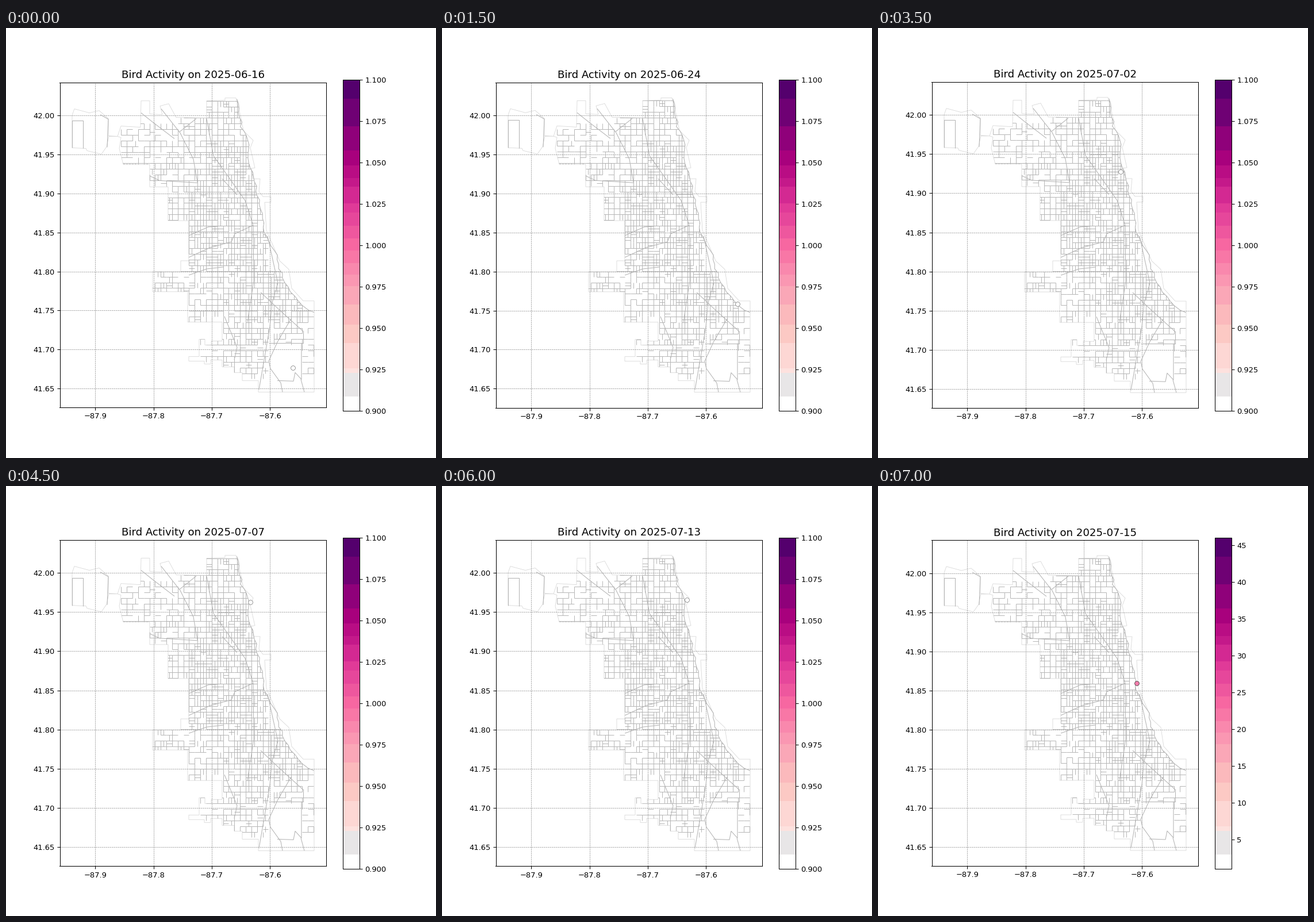
These frames come from a looping animation (748 by 748 pixels, 7.5 s). A matplotlib script:

```python
import numpy as np
import matplotlib.pyplot as plt
from matplotlib.animation import FuncAnimation
from matplotlib.cm import ScalarMappable
from matplotlib.collections import LineCollection
from matplotlib.colors import ListedColormap, Normalize
from matplotlib.patches import Polygon

BLOCK_W, BLOCK_H = 9.85, 9.9  # half a mile on the stage, in pixels
XLIM = (-87.9609, -87.5033)
YLIM = (41.62557, 42.04193)
rng = np.random.default_rng(7)


def geo(points):
    """Stage pixels to longitude and latitude."""
    x, y = np.asarray(points, float).T
    return np.column_stack([XLIM[0] + (x - 93.5) / 1013.5,
                            sum(YLIM) / 2 - (y - 377.75) / 1360.8])


def steps(x, y, *moves):
    """Right-angled path: the moves set x and y in turn."""
    path = [(x, y)]
    for k, value in enumerate(moves):
        x, y = (x, value) if k % 2 else (value, y)
        path.append((x, y))
    return path


def ragged(points, step=8, size=2.5):
    """Path with small seeded jogs, like a shoreline."""
    x, y = np.asarray(points, float).T
    ys = np.arange(y[0], y[-1], step)
    xs = np.interp(ys, y, x) + rng.uniform(-size, size, len(ys))
    return [*zip(xs, ys), points[-1]]


airport = [(194, 188), (179, 188), (175, 206), (166, 219), (141, 213), (139, 209),
           (115, 208), (115, 151), (119, 140), (145, 147), (162, 143), (178, 157),
           (178, 187)]
north = [(194, 188), (200, 170), (234, 172), *steps(235, 126, 250, 149),
         (272, 150), (268, 135), (283, 131), (296, 155), *steps(349, 156, 349, 126),
         (381, 125), (381, 121), (400, 121)]
lake = [(409, 157), (413, 178), (430, 195), (425, 208), (433, 243), (426, 244),
        *steps(430, 262, 442), (440, 284), (447, 293), *steps(461, 293, 461, 303, 450),
        (453, 352), (476, 405), (492, 420), (497, 453), (517, 475), (536, 475)]
shore = ragged([(401, 123), (411, 176), (424, 201), (421, 230), (438, 290),
                (446, 318), (447, 352), (470, 390), (478, 424), (491, 455),
                (516, 485), (536, 495)])
south = steps(536, 634, 439, 614, 411, 600, 397, 590, 376, 578, 356, 585, 345, 580,
              318, 572, 336, 542, 346, 552, 357, 545, 376, 512)
west = steps(316, 512, 316, 459, 255, 424, 304, 405, 318, 335, 282, 276, 250, 237, 204)
west += [(197, 209), (200, 190)]

rails = [
    steps(115, 208, 115, 160, 134, 209),
    [(164, 150), (178, 158), (176, 207)],
    [(235, 147), (255, 163), (293, 192)],
    [(270, 140), (303, 182), (326, 228), (333, 268)],
    [(331, 157), (302, 180)],
    [(376, 262), (402, 290)],
    [(250, 257), (267, 265), (333, 269)],
    [(318, 361), (352, 346), (368, 345)],
    [(318, 399), (355, 382), (392, 372), (398, 358), (430, 343)],
    [(318, 430), (350, 419), (378, 416)],
]
rivers = [
    [(349, 157), (361, 222), (390, 263), (416, 300), (430, 343)],
    [(430, 343), (431, 440), (420, 512)],
    [(455, 362), (473, 444), (463, 478), (459, 520), (440, 630)],
    [(443, 460), (478, 493), (518, 529)],
    [(380, 502), (402, 556), (397, 578)],
    [(496, 506), (472, 547), (457, 580), (460, 593), (478, 618), (481, 634)],
    steps(457, 549, 517, 528),
    [(472, 614), (500, 615), (503, 600), (514, 612), (514, 549)],
    [(513, 612), (519, 634)],
]

# First column and row, columns, rows, density
ZONES = [
    (-12, 1, 10, 3, .2), (-12, 4, 10, 5, .4), (-2, 0, 5, 12, .55),
    (3, -3, 8, 7, .6), (3, 4, 12, 8, .92), (-7, 8, 5, 4, .5),
    (-4, 12, 4, 7, .6), (0, 12, 14, 15, .85), (-7, 27, 7, 4, .5),
    (0, 27, 8, 9, .55), (8, 27, 14, 9, .8), (6, 36, 8, 10, .6),
    (14, 36, 8, 4, .2), (20, 40, 3, 6, .1), (2, 39, 4, 4, .1),
]

PLACES = {
    "marsh": (499, 591.6), "park": (514, 480.4), "yard": (358, 338),
    "harbor": (422, 250), "beach": (424.7, 202.3), "point": (426, 198.7),
    "pier": (450, 343),
}
DAYS = [
    "06-16 marsh", "06-19 beach", "06-21 beach", "06-24 park", "06-27 harbor",
    "06-30 yard", "07-01 point", "07-02 harbor", "07-04 point", "07-07 beach",
    "07-09 pier", "07-11 park", "07-13 point", "07-14 park", "07-15 pier",
]
TOPS = {"07-09": 2, "07-14": 10, "07-15": 46}  # days with more than one count

# Heights of the colour steps, from the bottom up
BANDS = [25, 41, 8, 44, 32, 35, 32, 20, 20, 22, 21, 22, 23, 16, 29, 15, 22, 26,
         42, 48, 33]


def streets():
    lines = []
    for col, row, cols, rows, density in ZONES:
        along = min(.93, .45 + .6 * density)
        down = min(.9, .35 + .65 * density)
        for i in range(col, col + cols):
            for j in range(row, row + rows):
                x, y = 318.5 + i * BLOCK_W, 155.7 + j * BLOCK_H
                r, b = x + BLOCK_W, y + BLOCK_H
                mx, my = (x + r) / 2, (y + b) / 2
                edges = [(along, (x, y), (r, y)),
                         (down, (x, y), (x, b)),
                         (.7 * density ** 2, (mx, y), (mx, b)),
                         (.35 * density ** 2, (x, my), (r, my))]
                lines += [geo([p, q]) for odds, p, q in edges if rng.random() < odds]
    return lines


def banded_cmap():
    ramp = plt.get_cmap("RdPu")
    colors, base = [], 0
    for k, size in enumerate(BANDS):
        color = ramp((base + size / 2) / sum(BANDS))
        if k < 2:
            color = ((1, 1, 1, 1), (.91, .902, .906, 1))[k]
        colors += [color] * size
        base += size
    return ListedColormap(colors)


fig, ax = plt.subplots(figsize=(8, 8), dpi=93.5)
ax.set_xticks(np.arange(-87.9, -87.55, 0.1))
ax.set_yticks(np.arange(41.65, 42.01, 0.05))
ax.grid(True, linestyle="--", color="gray", linewidth=0.5)

land = Polygon(geo(north + shore + south + west), fc="none", ec="none")
ax.add_patch(land)
for outline in (airport, north + lake + south + west):
    ax.add_patch(Polygon(geo(outline), fc="none", ec="#d6d6d6", lw=0.6))
grid = LineCollection(streets(), colors="#b0b0b0", linewidths=0.7)
ax.add_collection(grid, autolim=False)
grid.set_clip_path(land)
routes = [geo(path) for path in rails + rivers + [shore]]
ax.add_collection(LineCollection(routes, colors="#b4b4b4", linewidths=0.8), autolim=False)

dot = ax.scatter([0], [0], s=36, linewidths=0.6, zorder=3)
ax.set(xlim=XLIM, ylim=YLIM)
scale = ScalarMappable(Normalize(0.9, 1.1), banded_cmap())
fig.colorbar(scale, ax=ax)


def update(i):
    date, name = DAYS[i].split()
    place = geo([PLACES[name]])
    top = TOPS.get(date)
    crowded = date == "07-15"
    dot.set_offsets(place)
    dot.set_facecolor("#f27dab" if crowded else "white")
    dot.set_edgecolor("#404040" if crowded else "#808080")
    ax.set_aspect(1 / np.cos(np.radians(place[0, 1])))
    ax.set_title(f"Bird Activity on 2025-{date}", fontsize=14)
    scale.set_clim(*((1, top) if top else (0.9, 1.1)))
    return []


anim = FuncAnimation(fig, update, frames=len(DAYS), interval=500,
                     init_func=lambda: [], repeat=True, repeat_delay=0)
plt.show()
```
